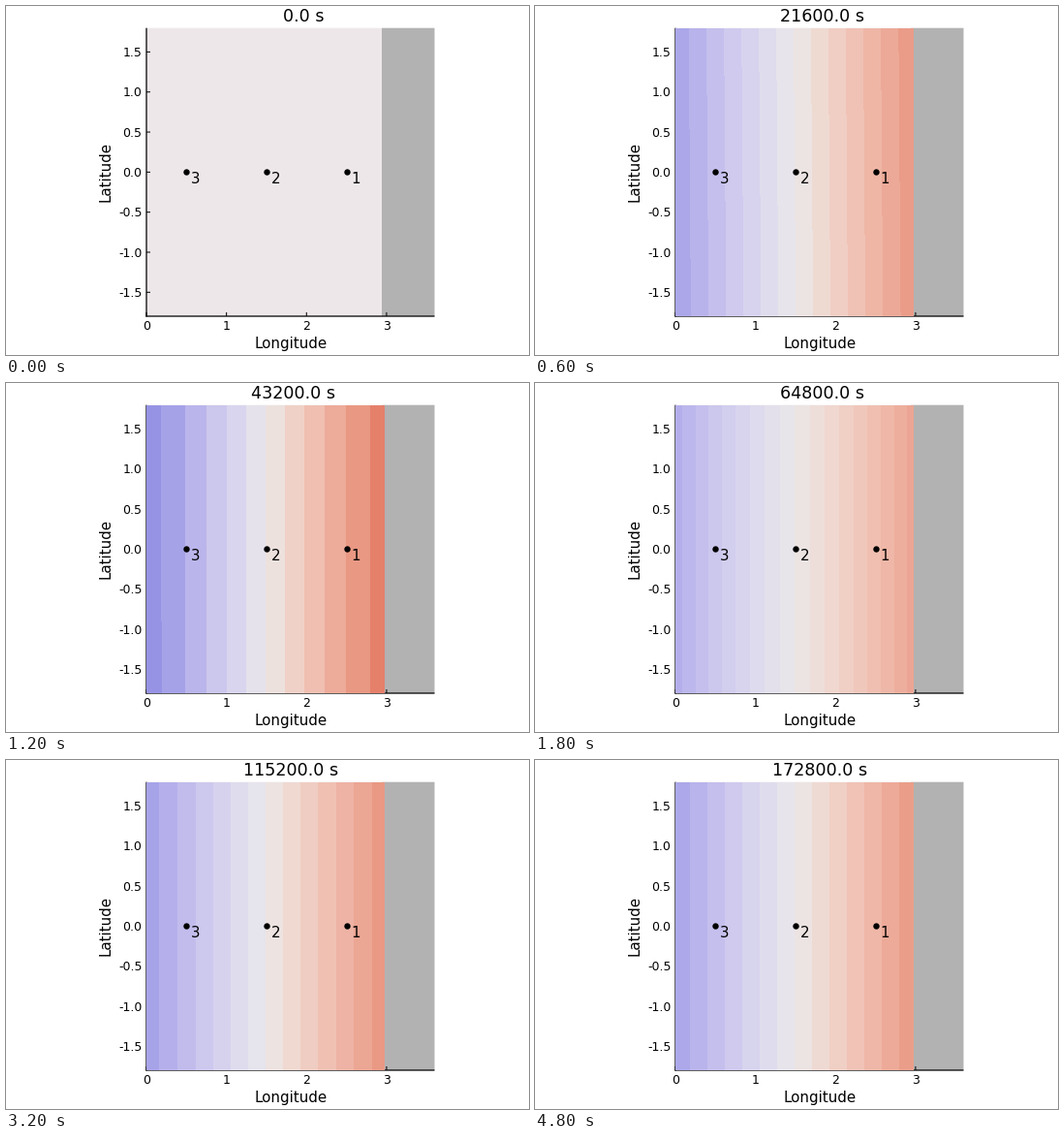
A matplotlib script for the animation above (5000 ms loop, 540 by 360 pixels).

```python
import numpy as np
import matplotlib.pyplot as plt
from matplotlib.animation import FuncAnimation
from matplotlib.patches import Rectangle

W, H, DPI = 540, 360, 100
FRAMES, INTERVAL, STEP_SECONDS = 25, 200, 7200
LEFT, RIGHT, TOP, BOTTOM = 145, 442.5, 22.7, 320
SCALE = (RIGHT - LEFT) / 3.6
MID_Y = (TOP + BOTTOM) / 2
SHORE, WET_EDGE = 388, 391

# Seiche of the basin: period and lag in hours, damping per hour
PERIOD, LAG, DAMPING, SETUP = 19.5, 1, .085, .79

plt.rcParams["font.family"] = "DejaVu Sans"
fig = plt.figure(figsize=(W / DPI, H / DPI), dpi=DPI, facecolor="white")
ax = fig.add_axes([0, 0, 1, 1])
ax.set_axis_off()


def pt(px):
    return px * 72 / DPI


def lon(x):
    return LEFT + x * SCALE


def lat(y):
    return MID_Y - y * SCALE


def label(x, y, text, size, ha="center", va="baseline", **kw):
    return ax.text(x, y, text, fontsize=pt(size), ha=ha, va=va, zorder=6, **kw)


def line(xs, ys, width):
    ax.plot(xs, ys, color="black", lw=pt(width), zorder=3,
            solid_capstyle="butt", snap=False)


def box(x0, x1, color):
    ax.add_patch(Rectangle((x0, TOP), x1 - x0, BOTTOM - TOP, fc=color,
                           ec="none", lw=0, zorder=1, snap=False))


# Blue to red scale for the water level
STOPS = [-.95, -.69, -.44, -.19, -.06, .06, .19, .44, .69, .81, .95]
COLORS = np.array([
    (150, 147, 229), (180, 175, 235), (205, 200, 238), (223, 220, 238),
    (231, 229, 236), (237, 228, 226), (240, 217, 209), (241, 192, 178),
    (236, 165, 147), (233, 152, 131), (229, 128, 107)])


def shade(level):
    return np.stack([np.interp(level, STOPS, c) for c in COLORS.T], -1) / 255


def water(hours):
    """Steady tilt plus a damped standing wave, drawn in flat bands."""
    xs = np.linspace(LEFT, WET_EDGE, 985)
    ys = np.linspace(-1, 1, 60)[:, None]
    slant = 2.6 * np.exp(-(hours / 6.5)**2) * ys
    s = (xs - slant - lon(1.49)) / (1.5 * SCALE)
    wave = -8 / np.pi**2 * np.exp(-DAMPING * hours) * np.cos(
        2 * np.pi * (hours - LAG) / PERIOD)
    bands = min(13.9 - wave * (10 if wave > 0 else 28), 18)
    step = 2 * (1 + wave) / bands
    tilt = s + wave * np.sin(np.pi * s / 2)
    return shade(SETUP * step * (np.floor(tilt / step) + .5))


box(LEFT, SHORE, "#ede7e9")
box(SHORE, RIGHT, "#b2b2b2")
line([LEFT, LEFT], [TOP, BOTTOM + .6], 1.25)
line([LEFT - .6, RIGHT], [BOTTOM, BOTTOM], 1.25)

for x in range(4):
    line([lon(x)] * 2, [BOTTOM, BOTTOM - 4], 1)
    label(lon(x), 334, str(x), 12.5)
for y in np.arange(-1.5, 1.6, .5):
    line([LEFT, LEFT + 4], [lat(y)] * 2, 1)
    label(140.6, lat(y) + 4.6, f"{y:.1f}", 12.5, ha="right")

label((LEFT + RIGHT) / 2, 353, "Longitude", 15)
label(110.5, MID_Y - 0.5, "Latitude", 15, rotation=90, ha="right", va="center")

for number, x in ((3, .5), (2, 1.5), (1, 2.5)):
    ax.plot(lon(x), MID_Y, "o", color="black", ms=pt(6.4), mew=0, zorder=5,
            snap=False)
    label(lon(x) + 9.6, 183, str(number), 15)

title = label(0, 15.5, "", 17.5)
field = ax.imshow(water(2), extent=(LEFT, WET_EDGE, BOTTOM, round(TOP)),
                  aspect="auto", interpolation="nearest", zorder=4)
ax.set_xlim(0, W)
ax.set_ylim(H, 0)


def update(i):
    seconds = i * STEP_SECONDS
    text = f"{seconds:.1f} s"
    title.set_text(text)
    title.set_x(307.7 - 2.7 * (len(text) - 5))
    field.set_visible(i > 0)
    if i:
        field.set_data(water(seconds / 3600))
    return title, field


anim = FuncAnimation(fig, update, frames=FRAMES, interval=INTERVAL,
                     repeat=True, repeat_delay=0, blit=False)
plt.show()
```
